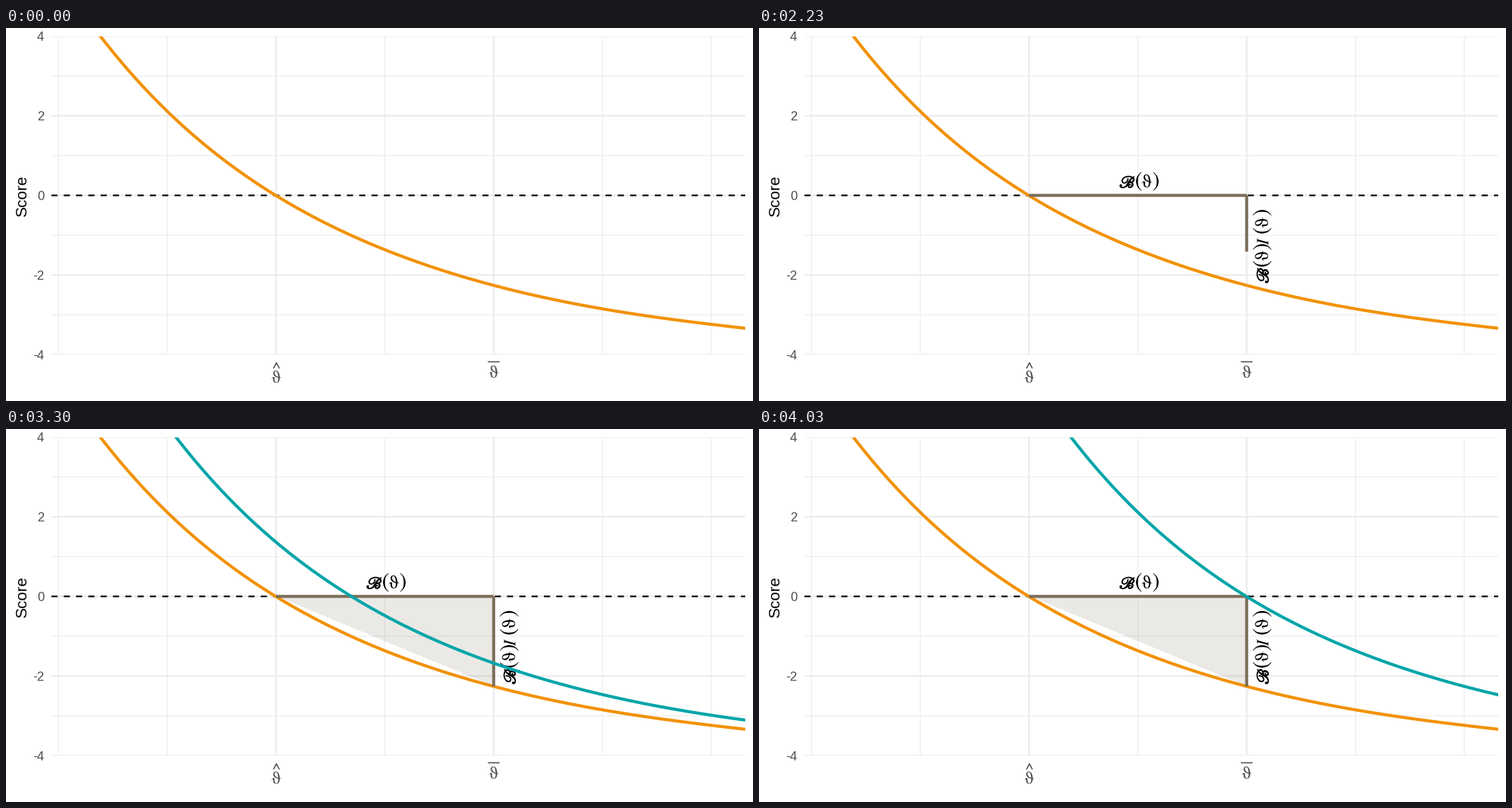
These frames come from a looping animation (1058 px wide and 529 px high, 9900 ms). A matplotlib script:

```python
import numpy as np
import matplotlib.pyplot as plt
from matplotlib.animation import FuncAnimation
from matplotlib.patches import PathPatch, Polygon, Rectangle
from matplotlib.textpath import TextPath
from matplotlib.transforms import Affine2D

W, H, DPI = 1058, 529, 100
PT = 72 / DPI                      # points per pixel
LOOP, INTERVAL = 9900, 30
STEP = LOOP / 204                  # the motion advances in 204 even steps

LEFT, RIGHT, TOP, BOTTOM = 64.3, 1047, 11.5, 463.2
X0, DX = 382.5, 154.1              # theta hat and half the way to theta bar
Y0, DY = 237.4, 56.45
SHIFT = 2 * DX

GRID, GREY = "#EBEBEB", "#4D4D4D"
ORANGE, TEAL, BROWN = "#F29100", "#00A5A9", "#7C6F5A"

plt.rcParams["font.family"] = "Liberation Sans"
plt.rcParams["mathtext.fontset"] = "stix"

fig = plt.figure(figsize=(W / DPI, H / DPI), dpi=DPI, facecolor="white")
ax = fig.add_axes([0, 0, 1, 1])
ax.set_xlim(0, W)
ax.set_ylim(H, 0)
ax.axis("off")
panel = Rectangle((LEFT, TOP), RIGHT - LEFT, BOTTOM - TOP,
                  transform=ax.transData)


def line(xs, ys, color, width, z, clip=True, **kw):
    """Line in pixel coordinates, optionally clipped to the panel."""
    item, = ax.plot(xs, ys, color=color, lw=width * PT, zorder=z,
                    solid_capstyle="butt", dash_capstyle="butt",
                    snap=False, **kw)
    if clip:
        item.set_clip_path(panel)
    return item


def glyph(tex, x, y, height, color="black", angle=0, bold=0):
    """Math symbol of the given height, centred on (x, y)."""
    path = TextPath((0, 0), f"${tex}$", size=40)
    box = path.get_extents()
    scale = height / box.height
    place = (Affine2D()
             .translate(-(box.x0 + box.x1) / 2, -(box.y0 + box.y1) / 2)
             .scale(scale, -scale).rotate_deg(-angle).translate(x, y))
    patch = PathPatch(place.transform_path(path), facecolor=color,
                      edgecolor=color if bold else "none",
                      lw=bold * PT, zorder=5)
    return ax.add_patch(patch)


# Score curve, in steps of DX from its zero
knots = [(-1.613, 4), (-1.48, 3.53), (-1, 2.11), (-0.957, 2.0),
         (-0.347, 0.625), (0, 0), (0.52, -0.79), (1, -1.36),
         (1.042, -1.42), (1.653, -1.987), (2, -2.265), (2.312, -2.466),
         (2.833, -2.767), (3, -2.855), (3.355, -3.006), (3.965, -3.228),
         (4, -3.24), (4.312, -3.338)]
score = np.poly1d(np.polyfit(*zip(*knots), 5))
u = np.linspace(-1.75, 4.4, 240)
curve_x, curve_y = X0 + DX * u, Y0 - DY * score(u)
drop = Y0 - DY * score(2)

# Grid, axes and the static curve
for k in range(-2, 5):
    x = X0 + k * DX
    line([x, x], [TOP, BOTTOM], GRID, 2.2 if k in (0, 2) else 1.1, 1)
for v in range(-4, 5):
    y = Y0 - v * DY
    major = v % 2 == 0
    line([LEFT, RIGHT], [y, y], GRID, 2.2 if major else 1.1, 1)
    if major:
        ax.text(54, y + 6.6, str(v).replace("\u2212", "-"), color=GREY,
                fontsize=18 * PT, ha="right", va="baseline")
ax.text(28.7, Y0, "Score", fontsize=22.5 * PT, rotation=90,
        rotation_mode="anchor", ha="center", va="baseline")

THETA = r"\mathrm{\vartheta}"
glyph(THETA, 383, 494.5, 17.5, GREY)
line([378.8, 383, 387.2], [482.8, 474.8, 482.8], GREY, 1.6, 5, clip=False)
glyph(THETA, 691, 487.3, 17.5, GREY)
line([682.5, 699], [473.4, 473.4], GREY, 1.6, 5, clip=False)

line([LEFT, RIGHT], [Y0, Y0], "black", 2.18, 2, linestyle=(0, (4, 4)))
line(curve_x, curve_y, ORANGE, 4.3, 3)

# Moving parts
triangle = ax.add_patch(Polygon([(X0, Y0), (X0 + SHIFT, Y0),
                                 (X0 + SHIFT, drop)],
                                facecolor=BROWN, alpha=0.15, lw=0, zorder=3.5))
across = line([], [], BROWN, 4.3, 4)
down = line([], [], BROWN, 4.3, 4)
shifted = line([], [], TEAL, 4.3, 6)

# Formula parts: symbol, offset along the text, offset across it, height, bold
bias = [(r"\mathscr{B}", 12.3, 0.8, 16.5, 1.1), ("(", 29, 0, 26.5, 0),
        (THETA, 40.5, -0.8, 18.5, 0), (")", 53, 0, 26.5, 0)]
info = bias + [("I", 60.5, 0.8, 16, 0), ("(", 76, 0, 26.5, 0),
               (THETA, 87.5, -0.8, 18.5, 0), (")", 101.5, 0, 26.5, 0)]
bias_label = [glyph(t, 509 + s, 217.6 + c, h, bold=b)
              for t, s, c, h, b in bias]
info_label = [glyph(t, 712.6 + c, 363.5 - s, h, angle=90, bold=b)
              for t, s, c, h, b in info]


def ramp(step, start, end):
    return min(max((step - start) / (end - start), 0), 1)


def update(i):
    step = int((i + 0.8) * INTERVAL / STEP)
    across.set_data([X0, X0 + SHIFT * ramp(step, 12, 28)], [Y0, Y0])
    down.set_data([X0 + SHIFT] * 2,
                  [Y0, Y0 + (drop - Y0) * ramp(step, 36, 52)])
    shifted.set_data(curve_x + SHIFT * ramp(step, 60, 83), curve_y)

    across.set_visible(step > 12)
    down.set_visible(step > 36)
    triangle.set_visible(step >= 59)
    shifted.set_visible(step >= 60)
    for part in bias_label:
        part.set_visible(step >= 12)
    for part in info_label:
        part.set_visible(step >= 36)
    return [across, down, triangle, shifted, *bias_label, *info_label]


anim = FuncAnimation(fig, update, frames=LOOP // INTERVAL, interval=INTERVAL,
                     repeat=True, repeat_delay=0, blit=False)
plt.show()
```
